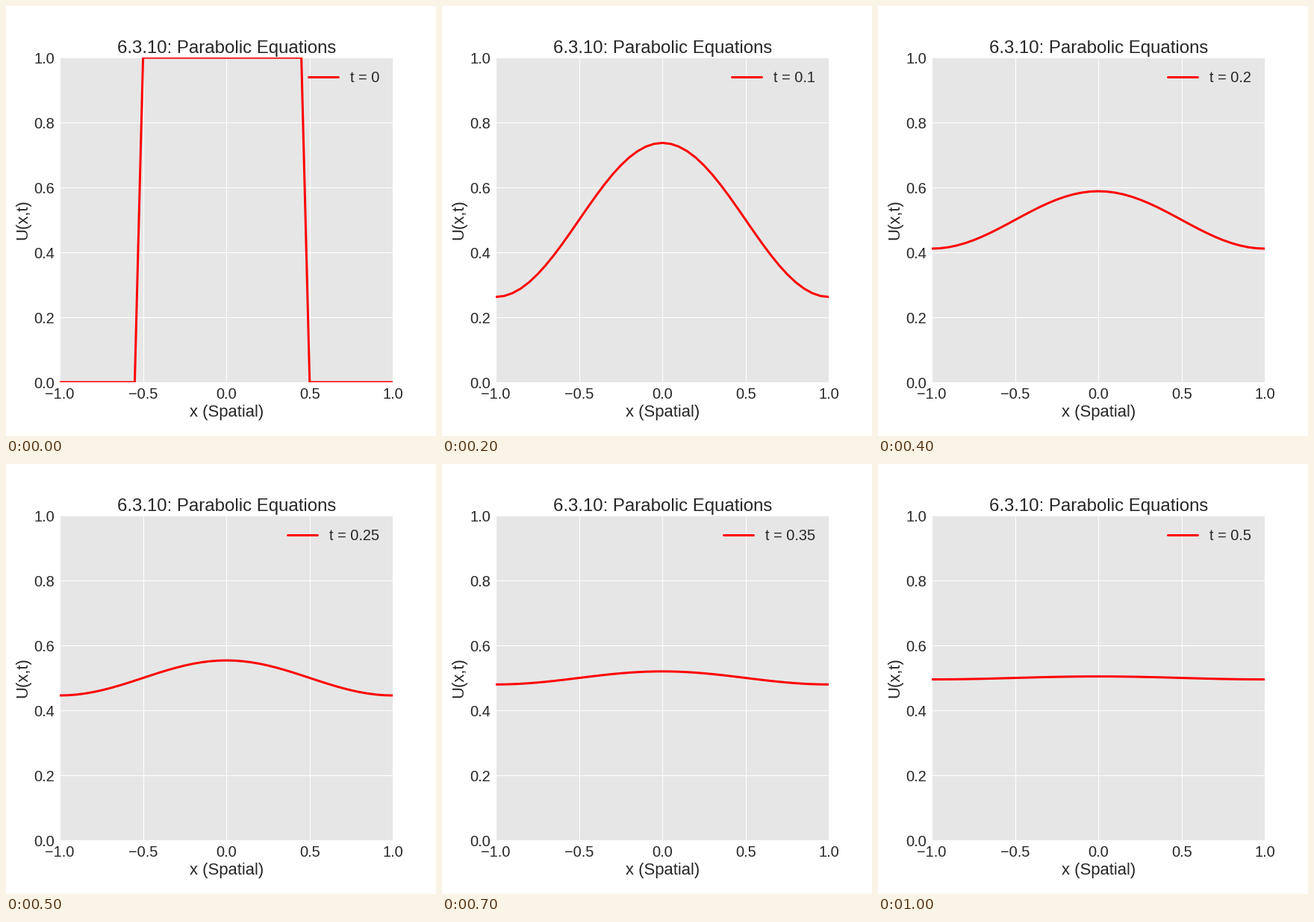
These frames come from a looping animation (576x576 px, 1100 ms). A matplotlib script:

```python
import numpy as np
import matplotlib.pyplot as plt
from matplotlib.animation import FuncAnimation

INK = "0.15"
STEP = 0.05
FRAMES = 11

plt.rcParams.update({
    "font.family": "Liberation Sans",
    "text.color": INK,
    "axes.labelcolor": INK,
    "axes.facecolor": "0.9",
    "axes.edgecolor": "white",
    "axes.linewidth": 0,
    "axes.axisbelow": True,
    "axes.grid": True,
    "axes.titlesize": 24,
    "axes.titlepad": 6,
    "axes.labelsize": 22,
    "axes.labelpad": 4,
    "grid.color": "white",
    "grid.linestyle": "-",
    "grid.linewidth": 1,
    "lines.solid_capstyle": "round",
    "legend.fontsize": 20,
    "legend.frameon": False,
})
for axis in ("xtick", "ytick"):
    plt.rcParams.update({
        f"{axis}.color": INK,
        f"{axis}.labelsize": 20,
        f"{axis}.major.size": 0,
        f"{axis}.major.pad": 7,
    })

x = np.linspace(-1, 1, 41)


def solution(t):
    """Heat equation on [-1, 1], starting from a unit box."""
    if t == 0:
        return np.where((x > -0.51) & (x < 0.49), 1.0, 0.0)
    k = np.arange(20)[:, None]
    w = np.pi * (2 * k + 1)
    terms = (-1.0) ** k * np.cos(w * x) / w * np.exp(-w**2 * t)
    return 0.5 + 2 * terms.sum(axis=0)


fig = plt.figure(figsize=(8, 8), dpi=72, facecolor="white")
fig.subplots_adjust(left=0.125, right=0.9, bottom=0.125, top=0.88)
ax = fig.add_subplot()
ax.set(xlim=(-1, 1), ylim=(0, 1),
       xticks=np.linspace(-1, 1, 5), yticks=np.linspace(0, 1, 6),
       xlabel="x (Spatial)", ylabel="U(x,t)",
       title="6.3.10: Parabolic Equations")
line, = ax.plot(x, solution(0), color="red", lw=3, label="t = 0")
legend_text = ax.legend(loc="upper right").get_texts()[0]


def update(i):
    t = i * STEP
    line.set_ydata(solution(t))
    legend_text.set_text(f"t = {t:g}")
    return line, legend_text


anim = FuncAnimation(fig, update, frames=FRAMES, interval=100,
                     repeat=True, repeat_delay=0, blit=False)
plt.show()
```
